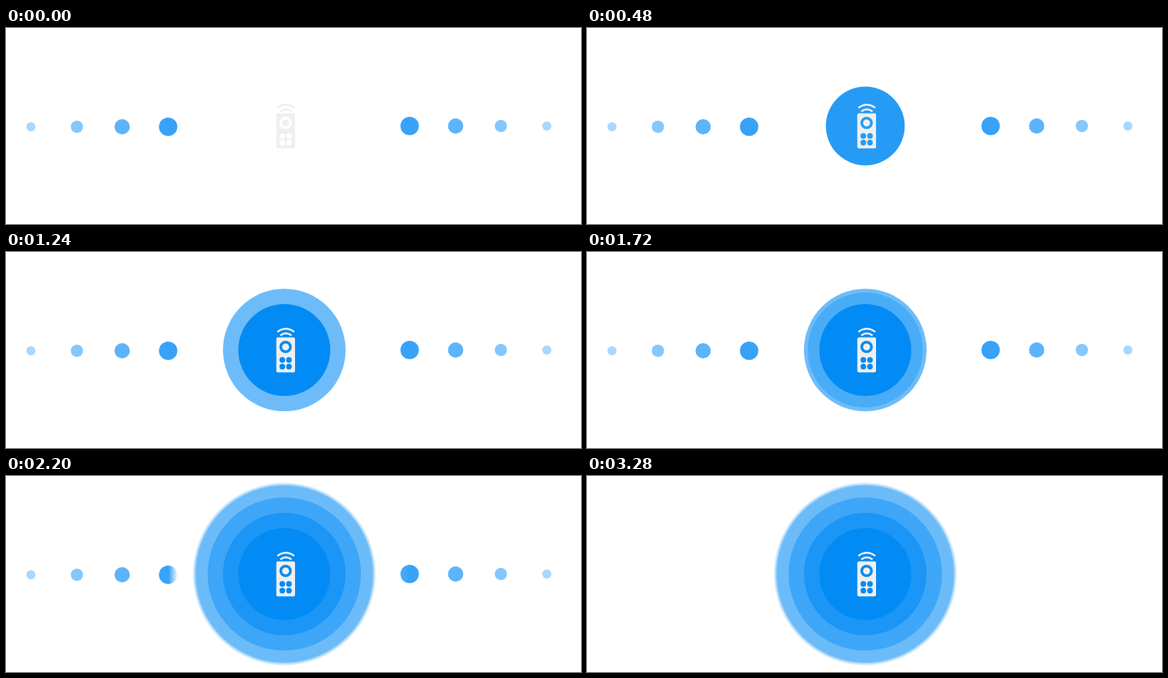
Recreate the animation shown at these times as an HTML page with a canvas. Size 750 px wide and 256 px high, loop 3.8 s.

```html
<!DOCTYPE html>
<html lang="en">
<head>
<meta charset="utf-8">
<title>Remote signal</title>
<style>
  html, body { margin: 0; width: 100%; height: 100%; overflow: hidden; background: #fff; }
  canvas { display: block; }
</style>
</head>
<body>
<canvas id="stage" width="750" height="256"></canvas>
<script>
const ctx = document.getElementById('stage').getContext('2d');
const LOOP = 3800, STEP = 40;
const CX = 363, CY = 128;
const TAU = Math.PI * 2;
const BLUE = '3,139,245';

const linear = u => u;
const easeOut = u => 1 - (1 - u) ** 2;

// Painted back to front; each disc grows and fades in together.
const DISCS = [
  { r: 120, alpha: 0.583, from: 1540, to: 2160, ease: easeOut, glow: true },
  { r: 100, alpha: 0.44, from: 1240, to: 1880, ease: linear },
  { r: 80, alpha: 0.576, from: 600, to: 1240, ease: linear },
  { r: 60, alpha: 1, from: 0, to: 560, ease: linear }
];

// Offset from the outermost dot, radius, colour
const DOTS = [
  [0, 6, '#a9d7fd'],
  [60, 8, '#86c7fd'],
  [119, 10, '#5db4fb'],
  [179, 12, '#38a2f9']
];

const progress = (t, from, to) => Math.min(1, Math.max(0, (t - from) / (to - from)));

function fillCircle(x, y, r, fill) {
  ctx.fillStyle = fill;
  ctx.beginPath();
  ctx.arc(x, y, r, 0, TAU);
  ctx.fill();
}

// White cover with a soft leading edge, spreading away from the centre.
function cover(clear, lead, end) {
  const g = ctx.createLinearGradient(clear, 0, lead, 0);
  g.addColorStop(0, 'rgba(255,255,255,1)');
  g.addColorStop(1, 'rgba(255,255,255,0)');
  ctx.fillStyle = g;
  ctx.fillRect(Math.min(CX, end), 0, Math.abs(end - CX), 256);
}

function drawDots(t) {
  for (const [dx, r, color] of DOTS) {
    fillCircle(32.5 + dx, 129, r, color);
    fillCircle(705.5 - dx, 128, r, color);
  }
  if (t < 2080) return;
  const dt = t - 2160;
  const left = 232 - 0.194 * dt;
  const right = 389 + 0.29 * dt;
  cover(left, left - 12, 0);
  cover(right, right + 127, 750);
}

function drawDisc(d, t) {
  const p = d.ease(progress(t, d.from, d.to));
  if (!p) return;
  const r = d.r * p, a = d.alpha * p;
  let fill = `rgba(${BLUE},${a})`;
  if (d.glow) {
    fill = ctx.createRadialGradient(CX, CY, 0, CX, CY, r);
    const stops = [[0, 1], [0.958, 1], [0.975, 0.5], [1, 0]];
    for (const [at, k] of stops) fill.addColorStop(at, `rgba(${BLUE},${a * k})`);
  }
  fillCircle(CX, CY, r, fill);
}

function hole(path, x, y, r) {
  path.moveTo(x + r, y);
  path.arc(x, y, r, 0, TAU);
}

const body = new Path2D();
body.roundRect(352.6, 111.5, 24.4, 45.8, 2);
hole(body, 364.7, 124, 8.1);
hole(body, 364.7, 124, 4.6);
for (const x of [360.4, 369.1])
  for (const y of [141, 149.8]) hole(body, x, y, 3.7);

const waves = new Path2D('M354 104.3Q365 96.2 376 104.3M357.8 109Q365 103.6 372.4 109');

function drawRemote() {
  ctx.fillStyle = ctx.strokeStyle = '#efefef';
  ctx.fill(body, 'evenodd');
  ctx.lineWidth = 2.5;
  ctx.stroke(waves);
}

function draw(t) {
  ctx.fillStyle = '#fff';
  ctx.fillRect(0, 0, 750, 256);
  drawDots(t);
  for (const d of DISCS) drawDisc(d, t);
  drawRemote();
}

const start = performance.now();
function tick() {
  const t = (performance.now() - start) % LOOP;
  draw(Math.floor(t / STEP) * STEP);
  requestAnimationFrame(tick);
}
tick();
</script>
</body>
</html>
```
